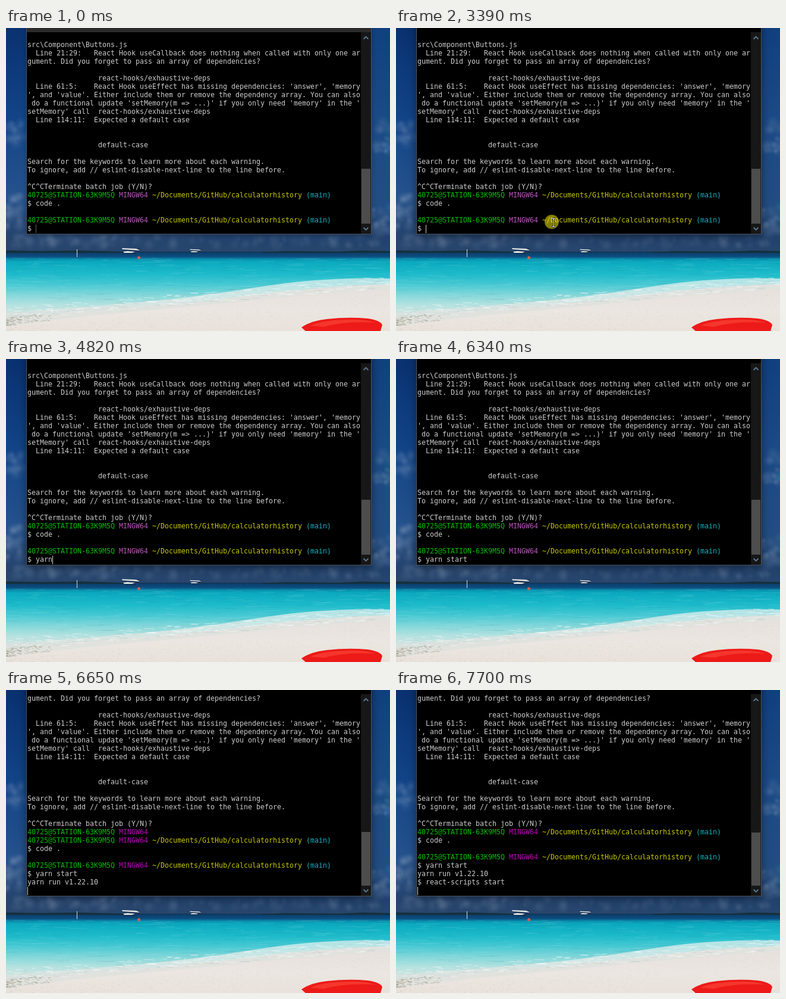
An HTML page with a canvas for the animation above (8000 ms loop, 646x508 px).

```html
<!DOCTYPE html>
<html lang="en">
<head>
<meta charset="utf-8">
<title>Terminal on a beach desktop</title>
<style>
html, body { margin: 0; width: 646px; height: 508px; overflow: hidden; background: #123a6b; }
body { position: relative; }
body > *, #win > * { position: absolute; }
#win { left: 35px; top: -20px; width: 579px; height: 365px; background: #000;
  box-shadow: 0 0 0 1px #4c535e, 0 2px 8px rgba(0,0,0,.3); }
#win.active { box-shadow: 0 0 0 1px #4c535e, 0 3px 15px rgba(0,0,0,.5); }
#bar { left: 0; top: 0; width: 579px; height: 27px; background: #2b2b2b; }
.active #bar { background: #000; }
#track { left: 562px; top: 27px; width: 17px; height: 338px; background: #171717; }
#thumb { left: 563px; width: 15px; background: #4d4d4d; }
#win svg { left: 562px; top: 27px; }
#text { left: 36px; top: 7px; margin: 0; color: #cccccc;
  font: 11.63px/14px "DejaVu Sans Mono", monospace; white-space: pre; }
.user { color: #00bf00; }
.sys { color: #b855b8; }
.late .sys { color: #b800b8; }
.path { color: #c8c800; }
.branch { color: #10b4c0; }
#caret { top: 330px; width: 1px; height: 14px; background: #d0d0d0; }
#caret.dotted { background: repeating-linear-gradient(#c0c0c0 0 1px, transparent 1px 2px); }
#click { left: 250px; top: 313px; width: 24px; height: 24px; border-radius: 50%; background: rgba(255,240,0,.52); }
#arrow, #beam { left: 0; top: 0; }
</style>
</head>
<body>
<canvas id="beach" width="646" height="508"></canvas>
<div id="win">
  <div id="bar"></div>
  <div id="track"></div>
  <div id="thumb"></div>
  <svg width="17" height="338" fill="none" stroke="#5b7896" stroke-width="1.8">
    <path d="M4.5 11.5 8.5 7.5 12.5 11.5M4.5 327.5 8.5 331.5 12.5 327.5"/>
  </svg>
</div>
<pre id="text"></pre>
<div id="caret"></div>
<div id="click"></div>
<svg id="arrow" width="14" height="20"><path d="M.5 .5v15l3.5-3.3 2.4 5.6 2.2-1-2.4-5.4h4.8z" fill="#fff" stroke="#000"/></svg>
<svg id="beam" width="8" height="17" fill="none">
  <path d="M1 1.5h2l1 1 1-1h2M4 2v13M1 15.5h2l1-1 1 1h2" stroke="#000" stroke-width="2.6"/>
  <path d="M1 1.5h2l1 1 1-1h2M4 2v13M1 15.5h2l1-1 1 1h2" stroke="#fff" stroke-width="1.1"/>
</svg>
<script>
const LOOP = 8000, ROWS = 24, CELL = 7, LEFT = 36;
const $ = id => document.getElementById(id);

// ---------- desktop picture ----------
const g = $("beach").getContext("2d");
let seed = 7;
const rnd = () => (seed = (seed * 16807) % 2147483647) / 2147483647;
const between = (a, b) => a + (b - a) * rnd();

function fade(x0, y0, x1, y1, stops) {
  const grad = g.createLinearGradient(x0, y0, x1, y1);
  stops.forEach(([p, c]) => grad.addColorStop(p, c));
  return grad;
}
function box(color, x, y, w, h) {
  g.fillStyle = color;
  g.fillRect(x, y, w, h);
}
function shape(color, d) {
  g.fillStyle = color;
  g.fill(new Path2D(d));
}
function cloud(x, y, rx, ry, puffs, alpha) {
  for (let i = 0; i < puffs; i++) {
    const px = x + between(-rx, rx), py = y + between(-ry, ry), r = between(5, 13);
    const soft = g.createRadialGradient(px, py, 0, px, py, r);
    soft.addColorStop(0, `rgba(165,182,205,${alpha})`);
    soft.addColorStop(1, "rgba(165,182,205,0)");
    box(soft, px - r, py - r, 2 * r, 2 * r);
  }
}
function seaplane(x, y, s) {
  g.save();
  g.translate(x, y);
  g.scale(s, s);
  shape("#1d3558", "M-11-2H6L12-5 15-6 14 1 8 3H-9Z");
  shape("#e4e6e4", "M-15-5 9-4 14-2 14-1-14-3ZM-13 1-6 0 7 1 2 3H-11Z");
  shape("#1a2c42", "M-10 4H9V5H-8Z");
  g.restore();
}

function paintBeach() {
  box(fade(0, 0, 0, 376, [[0, "#0a3170"], [.4, "#124487"], [.75, "#26528c"], [.93, "#25446e"], [1, "#28466c"]]), 0, 0, 646, 376);
  box(fade(0, 0, 0, 376, [[0, "#11407f"], [.4, "#1b4a86"], [.8, "#234d82"], [.93, "#21416c"], [1, "#28466c"]]), 330, 0, 316, 376);
  cloud(14, 175, 18, 22, 16, .13);
  cloud(10, 308, 16, 30, 22, .16);
  cloud(634, 185, 14, 26, 16, .15);
  cloud(632, 322, 16, 22, 18, .13);
  cloud(90, 356, 95, 8, 36, .1);
  cloud(400, 358, 240, 8, 60, .07);

  // sea
  box(fade(0, 375, 0, 480, [[0, "#0c3a66"], [.08, "#0c4f80"], [.12, "#0a90ae"], [.16, "#0ba9be"], [.35, "#1cbaca"], [.52, "#46c8d2"], [.7, "#86d8da"], [.85, "#b4e2e0"], [1, "#d2e4e0"]]), 0, 375, 646, 133);
  for (let i = 0; i < 320; i++) {
    const y = 386 + 70 * rnd() ** 1.3;
    box(rnd() < .5 ? "rgba(0,95,130,.09)" : "rgba(200,245,245,.13)", between(-20, 640), y, between(6, 34), 1);
  }

  // land on the horizon
  box("#17324a", 0, 375, 646, 1);
  shape("#14303c", "M0 373 60 374 120 373 200 375V377H0Z");
  shape("#14303c", "M430 376 470 374 560 375 600 373 646 374V377H430Z");

  // foam and sand
  shape(fade(0, 425, 0, 490, [[0, "rgba(222,240,238,.75)"], [1, "#d8dedb"]]),
    "M0 478Q90 471 200 462T420 435T646 420V508H0Z");
  shape("#e0e2de", "M0 488Q90 477 200 469T420 447T646 429V508H0Z");
  shape(fade(0, 440, 0, 508, [[0, "#e6e1dc"], [.5, "#ebe6e1"], [1, "#e9e2db"]]),
    "M0 501Q80 488 200 477T430 455T646 438V508H0Z");
  for (let i = 0; i < 260; i++) {
    const x = between(0, 646), y = 481 - x * .083 + between(-12, 7);
    box(rnd() < .65 ? "rgba(255,255,255,.5)" : "rgba(140,170,170,.2)", x, y, between(3, 16), 1);
  }
  for (let i = 0; i < 110; i++) {
    const x = 75 * rnd() ** 1.6;
    box("rgba(135,125,95,.35)", x, 492 - x * .12 + between(-7, 7), between(2, 5), 1);
  }
  for (let i = 0; i < 500; i++) {
    const x = between(0, 646);
    box("rgba(150,138,128,.1)", x, between(502 - x * .09, 508), 2, 1);
  }

  // boats, buoy, parasol
  box("#d9e2e8", 119, 371, 1, 13);
  seaplane(210, 374, 1);
  seaplane(319, 374, .65);
  shape("#e25a4c", "M221 385a2.5 2.5 0 0 1 5 0a2.5 2.5 0 0 1-5 0Z");
  shape("#ec1a18", "M497 502Q512 491 540 488Q575 484 608 487Q630 490 633 498L630 508H504Z");
  shape("#f5362c", "M512 499Q532 490 572 489Q604 488 622 494Q570 491 535 501Z");
}
paintBeach();

// ---------- terminal contents ----------
const hooks = "react-hooks/exhaustive-deps", tab = " ".repeat(17), PROMPT = "prompt";
const log = [
  "",
  "src\\Component\\Buttons.js",
  "  Line 21:29:   React Hook useCallback does nothing when called with only one ar",
  "gument. Did you forget to pass an array of dependencies?",
  "",
  tab + hooks,
  "  Line 61:5:    React Hook useEffect has missing dependencies: 'answer', 'memory",
  "', and 'value'. Either include them or remove the dependency array. You can also",
  " do a functional update 'setMemory(m => ...)' if you only need 'memory' in the '",
  "setMemory' call  " + hooks,
  "  Line 114:11:  Expected a default case",
  "", "",
  tab + "default-case",
  "",
  "Search for the keywords to learn more about each warning.",
  "To ignore, add // eslint-disable-next-line to the line before.",
  "",
  "^C^CTerminate batch job (Y/N)?",
  PROMPT,
  "$ code .",
  "",
  PROMPT
];
const output = ["$ yarn start", "yarn run v1.22.10", "$ react-scripts start"];
const promptParts = [
  ["user", "40725@STATION-63K9M5Q"], ["sys", " MINGW64"],
  ["path", " ~/Documents/GitHub/calculatorhistory"], ["branch", " (main)"]
];
const span = ([cls, s]) => `<span class="${cls}">${s}</span>`;
const prompt = n => promptParts.slice(0, n).map(span).join("");
const esc = s => s.replace(/&/g, "&amp;").replace(/</g, "&lt;").replace(/>/g, "&gt;");
const page = shift => [...log, ...output.slice(0, shift)].slice(shift, shift + ROWS)
  .map(s => s === PROMPT ? prompt(4) : esc(s));

// Each step changes only the named parts of the screen.
const steps = [
  [0, { typed: "", shift: 0, half: false, caret: true, active: false, click: false, mouse: null }],
  [150, { mouse: [524, 489] }],
  [200, { mouse: [438, 436] }],
  [250, { mouse: [346, 376] }],
  [300, { mouse: [286, 333], beam: true }],
  [350, { mouse: [261, 318] }],
  [3390, { active: true, click: true }],
  [3490, { click: false }],
  [3900, { caret: false }],
  [4450, { caret: true }],
  [4520, { typed: "y", mouse: null }],
  [4620, { typed: "ya" }],
  [4720, { typed: "yar" }],
  [4820, { typed: "yarn" }],
  [5170, { typed: "yarn " }],
  [5320, { typed: "yarn s" }],
  [5390, { typed: "yarn st" }],
  [5540, { typed: "yarn sta" }],
  [5640, { typed: "yarn star" }],
  [5790, { typed: "yarn start" }],
  [6340, { caret: false }],
  [6390, { shift: 1, caret: true }],
  [6650, { shift: 2, half: true }],
  [6700, { shift: 3, half: false }],
  [7190, { caret: false }],
  [7700, { caret: true }]
];

function rowsFor(s) {
  if (!s.shift) return [...page(0), "$ " + s.typed];
  if (!s.half) return page(s.shift);
  // partly repainted screen: upper rows already moved on
  return [...page(3).slice(0, 16), prompt(2), ...page(2).slice(17)];
}
function place(el, on, [x, y] = [0, 0]) {
  el.style.visibility = on ? "visible" : "hidden";
  el.style.transform = `translate(${x}px,${y}px)`;
}
function show(s) {
  const scrolled = s.shift > 0;
  $("text").innerHTML = rowsFor(s).join("\n");
  $("text").className = scrolled ? "late" : "";
  $("win").className = s.active ? "active" : "";
  $("thumb").style.top = 256 + s.shift + "px";
  $("thumb").style.height = 92 - s.shift + "px";
  $("caret").className = s.active ? "" : "dotted";
  place($("caret"), s.caret, [LEFT + (scrolled ? 0 : CELL * (2 + s.typed.length)), 0]);
  place($("click"), s.click);
  place($("arrow"), s.mouse && !s.beam, s.mouse || undefined);
  place($("beam"), s.mouse && s.beam, s.mouse || undefined);
}

const start = performance.now();
let shown = -1;
function tick() {
  const t = (performance.now() - start) % LOOP;
  const n = steps.filter(([at]) => at <= t).length;
  if (n !== shown) {
    shown = n;
    show(Object.assign({}, ...steps.slice(0, n).map(([, change]) => change)));
  }
  requestAnimationFrame(tick);
}
tick();
</script>
</body>
</html>
```
